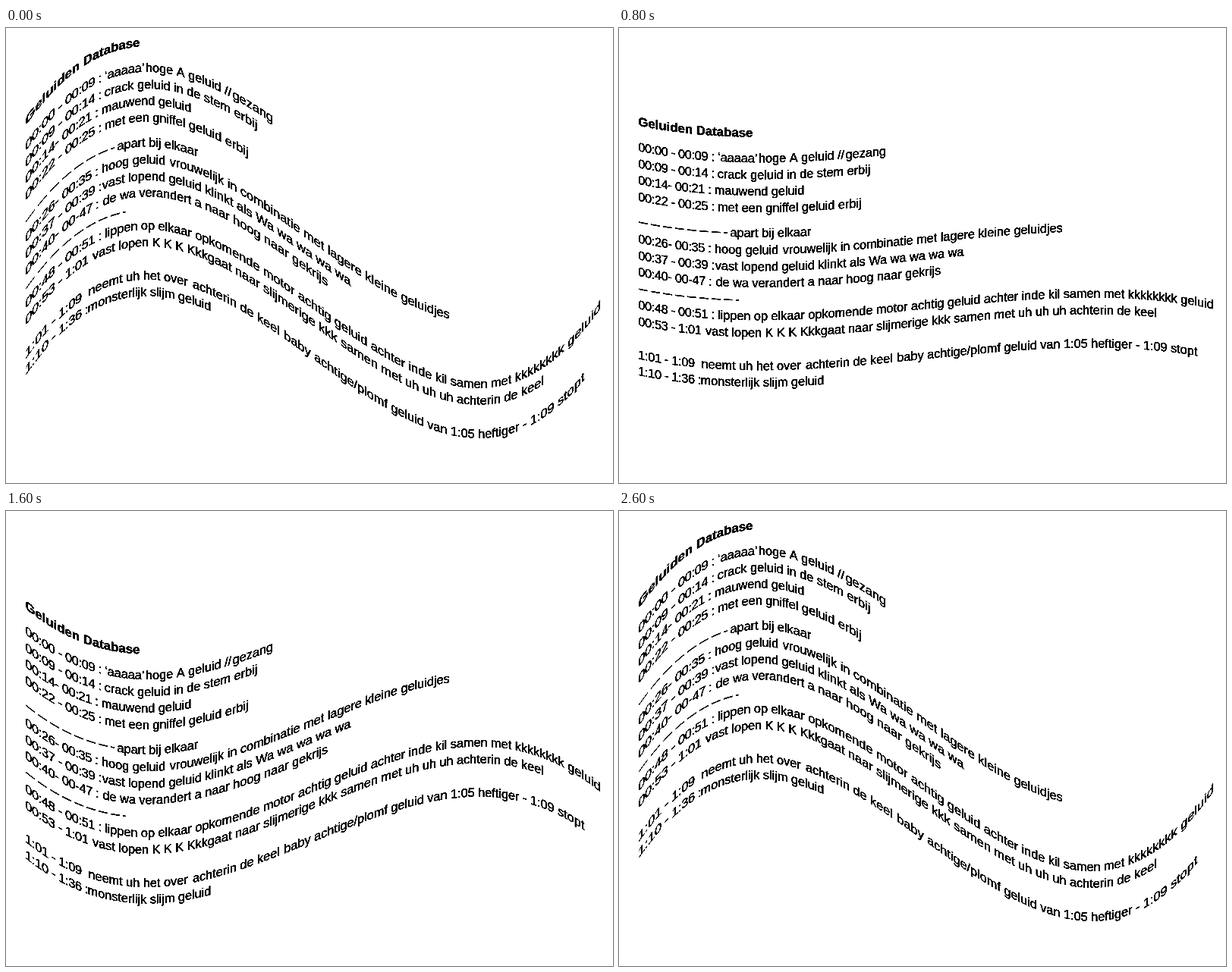
Recreate the animation shown at these times as an HTML page with a canvas. Size 800 by 600 pixels, loop 2700 ms.

```html
<!DOCTYPE html>
<html lang="nl">
<head>
<meta charset="utf-8">
<title>Geluiden Database</title>
<style>
html, body { margin: 0; width: 100%; height: 100%; overflow: hidden; background: #fff; }
/* Hard black and white edges, partly covered pixels turn black */
canvas { display: block; filter: brightness(.61) contrast(10); }
</style>
</head>
<body>
<canvas id="stage" width="800" height="600"></canvas>
<script>
const W = 800, H = 600, SCALE = 2;
const LEFT = 26, RIGHT = 783, FAMILY = '"Liberation Sans", Arial, sans-serif';

// baseline, time label, then pairs of x and text
const rows = [
  [162.6, '00:00 - 00:09 :', 130, '‘aaaaa’', 184, 'hoge A geluid //', 298.6, 'gezang'],
  [184.4, '00:09 - 00:14 :', 129.7, 'crack geluid in de stem erbij'],
  [206.2, '00:14- 00:21 :', 125.8, 'mauwend geluid'],
  [228, '00:22 - 00:25 :', 130, 'met een gniffel geluid erbij'],
  [260.9, '', 146.5, 'apart bij elkaar'],
  [283.4, '00:26- 00:35 :', 126, 'hoog geluid', 215.8, 'vrouwelijk in combinatie met lagere kleine geluidjes'],
  [305.4, '00:37 - 00:39 :', 126.8, 'vast lopend geluid klinkt als Wa wa wa wa wa'],
  [327.2, '00:40- 00-47 :', 127.5, 'de wa verandert a naar hoog naar gekrijs'],
  [370.6, '00:48 - 00:51 :', 130, 'lippen op elkaar opkomende motor achtig geluid achter inde kil samen met kkkkkkkk geluid'],
  [392.5, '00:53 - 1:01', 114, 'vast lopen K K K Kkk', 265.8, 'gaat naar slijmerige kkk samen met uh uh uh achterin de keel'],
  [436.4, '1:01 - 1:09', 108.5, 'neemt uh het over', 246, 'achterin de keel', 366.3, 'baby achtige/plomf geluid van 1:05 heftiger - 1:09 stopt'],
  [458.1, '1:10 - 1:36 :', 107.6, 'monsterlijk slijm geluid']
];

function drawPage() {
  const page = document.createElement('canvas');
  page.width = W * SCALE;
  page.height = H * SCALE;
  const g = page.getContext('2d');
  g.scale(SCALE, SCALE);
  g.fillStyle = '#fff';
  g.fillRect(0, 0, W, H);
  g.fillStyle = '#000';

  g.font = `bold 16.8px ${FAMILY}`;
  g.fillText('Geluiden Database', 25.3, 129);

  g.font = `16.27px ${FAMILY}`;
  for (const [y, label, ...parts] of rows) {
    g.letterSpacing = '-0.3px';
    g.fillText(label, 25.3, y);
    g.letterSpacing = '0px';
    for (let i = 0; i < parts.length; i += 2) g.fillText(parts[i + 1], parts[i], y);
  }

  g.lineWidth = 1.3;
  g.setLineDash([12, 4]);
  for (const [y, length] of [[256, 117], [344.3, 132]]) {
    g.beginPath();
    g.moveTo(LEFT, y);
    g.lineTo(LEFT + length, y);
    g.stroke();
  }
  return page;
}

// Vertical shift of a column in a fully bent flag
function wave(x) {
  const u = (x - LEFT) / (RIGHT - LEFT);
  return u < 0 || u > 1 ? 0 : 1086 * u * (1 - u) * (2 * u - 1);
}

function bend(step) {
  if (step < 13) return 1 - step / 7;
  return step < 26 ? (step - 13) / 7 - 1 : 1;
}

const ctx = document.getElementById('stage').getContext('2d');
const page = drawPage();
let shown = -1;

function frame(now) {
  const step = Math.floor(now / 100) % 27;
  if (step !== shown) {
    shown = step;
    ctx.fillStyle = '#fff';
    ctx.fillRect(0, 0, W, H);
    for (let x = 0; x < W; x++) {
      const dy = bend(step) * wave(x + 0.5);
      ctx.drawImage(page, x * SCALE, 0, SCALE, H * SCALE, x, dy, 1, H);
    }
  }
  requestAnimationFrame(frame);
}
frame(performance.now());
</script>
</body>
</html>
```
